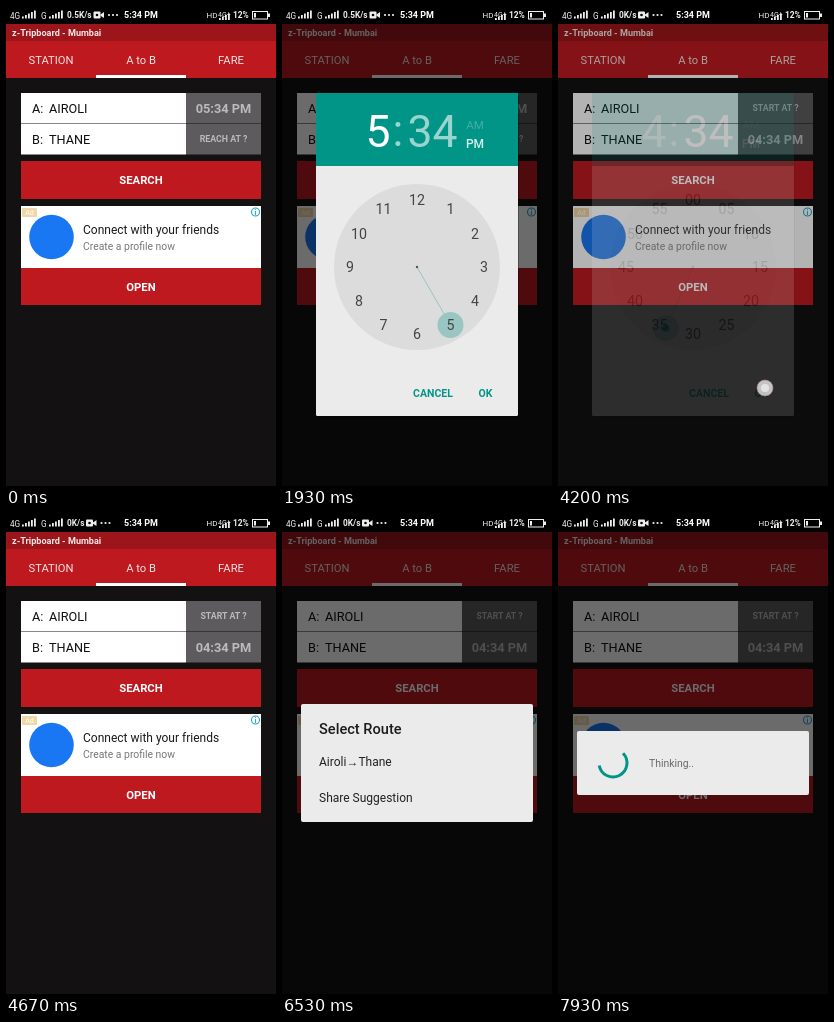
Animation of 270 by 480 pixels, one loop 8000 ms. Source, as an HTML page:

```html
<!DOCTYPE html>
<html lang="en">
<head>
<meta charset="utf-8">
<title>Route planner</title>
<style>
html, body { margin: 0; width: 100%; height: 100%; overflow: hidden; background: #000; }
svg { display: block; width: 100%; height: 100%; }
text { font-family: Roboto, "Noto Sans", sans-serif; white-space: pre; }
.b { font-weight: 700; }
.m { font-weight: 500; }
.c { text-anchor: middle; }
</style>
</head>
<body>
<svg id="stage" viewBox="0 0 270 480"></svg>
<script>
const LOOP = 8000, CX = 135, CY = 261, RING = 67;
const RED = '#bd191f', TEAL = '#009587', PANEL = '#ebebeb';
const stage = document.getElementById('stage');

const rect = (x, y, w, h, fill, more = '') =>
  `<rect x="${x}" y="${y}" width="${w}" height="${h}" fill="${fill}" ${more}/>`;
const circle = (x, y, r, fill, more = '') =>
  `<circle cx="${x}" cy="${y}" r="${r}" fill="${fill}" ${more}/>`;
const text = (x, y, size, fill, str, cls = '', more = '') =>
  `<text x="${x}" y="${y}" font-size="${size}" fill="${fill}" class="${cls}" ${more}>${str}</text>`;
const group = (id, body, more = '') => `<g id="${id}" ${more}>${body}</g>`;

function bars(x, base, n) {
  let out = '';
  for (let i = 0; i < n; i++) {
    const h = 2 + i * 1.5;
    out += rect(x + i * 3, base - h, 1.8, h, '#eee');
  }
  return out;
}

function statusBar() {
  const camera = rect(0, 5.5, 7, 7, '#eee', 'rx="1"') +
    '<path d="M7 8.5l3.5-2.5v6L7 9.8z" fill="#eee"/>' + circle(3.5, 9, 1.3, '#000');
  const dots = [15.5, 19.5, 23.5].map(x => circle(x, 9, 1.1, '#eee')).join('');
  return rect(0, 0, 270, 18, '#000') +
    text(4, 12.5, 8.2, '#eee', '4G') + bars(16, 12.5, 5) +
    text(35, 12.5, 8.2, '#eee', 'G') + bars(43, 12.5, 5) +
    text(61, 12.3, 8.3, '#eee', '', 'b', 'id="speed"') +
    group('camera', camera + dots) +
    text(118, 12.4, 9, '#fff', '5:34 PM', 'b') +
    text(200.5, 12, 8, '#eee', 'HD') +
    text(212, 10.5, 7, '#eee', '4G+') + bars(213, 14, 4) +
    text(227, 12.4, 8.4, '#eee', '12%', 'b') +
    rect(246.5, 5.5, 15, 7.5, 'none', 'stroke="#eee"') +
    rect(262, 7.5, 2, 3.5, '#eee') + rect(248, 7, 2, 4.5, '#eee');
}

function mainScreen() {
  const tabs = [[45, 'STATION'], [135, 'A to B'], [225, 'FARE']]
    .map(([x, s]) => text(x, 58, 11.2, '#f4e4e4', s, 'c')).join('');
  const field = (y, key, place) => rect(15, y, 165, 30.5, '#fff') +
    rect(180, y, 75, 30.5, '#5d5b5d') +
    text(26, y + 19.5, 12.7, '#111', key) + text(43, y + 19.5, 12.7, '#111', place);
  const button = (y, h, s) => rect(15, y, 240, h, RED) +
    text(135, y + h / 2 + 4, 11.3, '#fff', s, 'b c');
  return rect(0, 18, 270, 462, '#131112') +
    rect(0, 18, 270, 17, '#9c151a') +
    text(6, 30, 9.1, '#f5e6e6', 'z-Tripboard - Mumbai', 'b') +
    rect(0, 35, 270, 37, RED) + tabs + rect(90, 69, 90, 3, '#fff') +
    field(87, 'A:', 'AIROLI') + field(118, 'B:', 'THANE') +
    text(217.5, 0, 9, '#bbb', '', 'b c', 'id="start"') +
    text(217.5, 0, 9, '#bbb', '', 'b c', 'id="reach"') +
    button(155, 38, 'SEARCH') +
    rect(15, 200, 240, 62, '#fff') +
    rect(16, 202, 15, 9, '#f1d7a5', 'rx="1"') + text(23.5, 209.3, 7, '#fff', 'Ad', 'c') +
    circle(45.5, 231, 22.3, '#1977f3') +
    circle(249.5, 206, 4, '#fff', 'stroke="#22a7cf" stroke-width="1.1"') +
    text(249.5, 208.6, 7, '#22a7cf', 'i', 'b c') +
    text(77, 228, 12, '#1a1a1a', 'Connect with your friends') +
    text(77, 244, 10.4, '#777', 'Create a profile now') +
    button(262, 37, 'OPEN');
}

function timeDialog() {
  return rect(35, 89, 202, 323, '#000', 'opacity=".3" rx="2"') +
    rect(34, 87, 202, 323, PANEL, 'rx="1.5"') + rect(34, 87, 202, 73, TEAL) +
    text(96, 141, 44.5, '#fff', '5', 'c', 'id="hour"') +
    text(116, 140, 44.5, '#fff', ':', 'c', 'opacity=".6"') +
    text(150.5, 141, 44.5, '#fff', '34', 'c', 'id="minute"') +
    text(193, 123, 11.6, '#fff', 'AM', 'c', 'opacity=".25"') +
    text(193, 141.5, 12, '#fff', 'PM', 'm c', 'opacity=".85"') +
    circle(CX, CY, 83, '#dcdcdc') + group('hours', '') + group('minutes', '') +
    circle(CX, CY, 1.2, '#555') +
    text(151, 390.5, 10.5, TEAL, 'CANCEL', 'b c') + text(203.5, 390.5, 10.5, TEAL, 'OK', 'b c');
}

const routeDialog = () => rect(19, 190, 232, 118, PANEL, 'rx="2"') +
  text(37, 219.5, 14.6, '#1c1c1c', 'Select Route', 'm') +
  text(37, 252, 12, '#222', 'Airoli→Thane') +
  text(37, 288, 12, '#222', 'Share Suggestion');

const waitDialog = () => rect(19, 217, 232, 64, PANEL, 'rx="2"') +
  `<path id="spin" fill="none" stroke="${TEAL}" stroke-width="3"/>` +
  text(91, 253, 10.4, '#6b6b6b', 'Thinking..');

stage.innerHTML = mainScreen() +
  rect(0, 18, 270, 462, '#000', 'id="dim"') +
  group('timeDlg', timeDialog()) + group('routeDlg', routeDialog()) +
  group('waitDlg', waitDialog()) + statusBar() +
  group('touch', circle(0, 0, 8, '#fff', 'fill-opacity=".72" stroke="#b9807c" stroke-opacity=".6"') +
    circle(0, 0, 4, '#fff', 'fill-opacity=".55"'));

const el = id => document.getElementById(id);
const set = (id, attrs) => {
  for (const k in attrs) el(id).setAttribute(k, attrs[k]);
};
const show = (id, a) => set(id, { opacity: a, display: a > 0 ? 'inline' : 'none' });

// Piecewise linear value through [time, value] points.
function track(t, pts) {
  if (t <= pts[0][0]) return pts[0][1];
  for (let i = 1; i < pts.length; i++) {
    const [t0, a] = pts[i - 1], [t1, b] = pts[i];
    if (t < t1) return a + (b - a) * (t - t0) / (t1 - t0);
  }
  return pts[pts.length - 1][1];
}

const polar = (deg, r, x = CX, y = CY) => {
  const a = deg * Math.PI / 180;
  return [x + r * Math.sin(a), y - r * Math.cos(a)];
};

function dial(labels, angle, scale, dot) {
  const r = RING * scale;
  const [x, y] = polar(angle, r), [lx, ly] = polar(angle, r - 13);
  const line = `<line x1="${CX}" y1="${CY}" x2="${lx}" y2="${ly}" stroke="${TEAL}" stroke-opacity=".4" stroke-width=".8"/>`;
  const nums = labels.map((s, i) => {
    const [px, py] = polar(i * 30, r);
    return text(px, py + 5, 14.2, '#444', s, 'c');
  }).join('');
  return line + circle(x, y, 13, TEAL, 'fill-opacity=".3"') +
    (dot ? circle(x, y, 3.6, TEAL) : '') + nums;
}

const HOURS = Array.from({ length: 12 }, (_, i) => String(i || 12));
const MINUTES = Array.from({ length: 12 }, (_, i) => String(i * 5).padStart(2, '0'));

const TAPS = [
  [470, 670, 217, 133], [2070, 2200, 194, 294], [4000, 4300, 207, 382],
  [6000, 6130, 232, 174], [7470, 7600, 110, 249]
];

function pickTime(id, y, value, idle) {
  el(id).textContent = value || idle;
  set(id, { y: y + (value ? 19.7 : 18.4), 'font-size': value ? 12.8 : 8.8 });
}

function draw(t) {
  const idleNet = t >= 2400;
  el('speed').textContent = idleNet ? '0K/s' : '0.5K/s';
  set('camera', { transform: `translate(${idleNet ? 80 : 87.5} 0)` });

  const chosen = t >= 4120;
  pickTime('start', 87, chosen ? '' : '05:34 PM', 'START AT ?');
  pickTime('reach', 118, chosen ? '04:34 PM' : '', 'REACH AT ?');

  show('dim', track(t, [[670, 0], [800, .37], [930, .58], [4080, .58], [4200, .3], [4340, 0],
    [6250, 0], [6500, .58], [7580, .58], [7700, .48], [7860, .58]]));
  show('timeDlg', track(t, [[650, 0], [800, .96], [870, 1], [4080, 1], [4200, .15], [4270, 0]]));
  show('routeDlg', track(t, [[6260, 0], [6470, 1], [7580, 1], [7720, 0]]));
  show('waitDlg', track(t, [[7650, 0], [7860, 1]]));

  const picked = t >= 2070, swapped = t >= 2200;
  el('hour').textContent = picked ? '4' : '5';
  set('hour', { opacity: swapped ? .6 : 1 });
  set('minute', { opacity: swapped ? 1 : .6 });

  // Hours fly outwards while minutes settle in.
  const out = track(t, [[2200, 1], [2300, .95], [2700, 1.3]]);
  const inn = track(t, [[2325, 1.3], [2725, .95], [2825, 1]]);
  show('hours', track(t, [[2200, 1], [2700, 0]]));
  show('minutes', track(t, [[2325, 0], [2825, 1]]));
  el('hours').innerHTML = dial(HOURS, picked ? 120 : 150, out, false);
  el('minutes').innerHTML = dial(MINUTES, 204, inn, true);

  const from = track(t, [[7650, 0], [7930, 46]]);
  const sweep = track(t, [[7650, 20], [7930, 214]]);
  const [ax, ay] = polar(from, 14, 55, 249), [bx, by] = polar(from + sweep, 14, 55, 249);
  set('spin', { d: `M${ax} ${ay}A14 14 0 ${sweep > 180 ? 1 : 0} 1 ${bx} ${by}` });

  const tap = TAPS.find(([a, b]) => t >= a && t < b);
  show('touch', tap ? 1 : 0);
  if (tap) set('touch', { transform: `translate(${tap[2]} ${tap[3]})` });
}

const begin = performance.now();
function tick() {
  draw((performance.now() - begin) % LOOP);
  requestAnimationFrame(tick);
}
tick();
</script>
</body>
</html>
```
